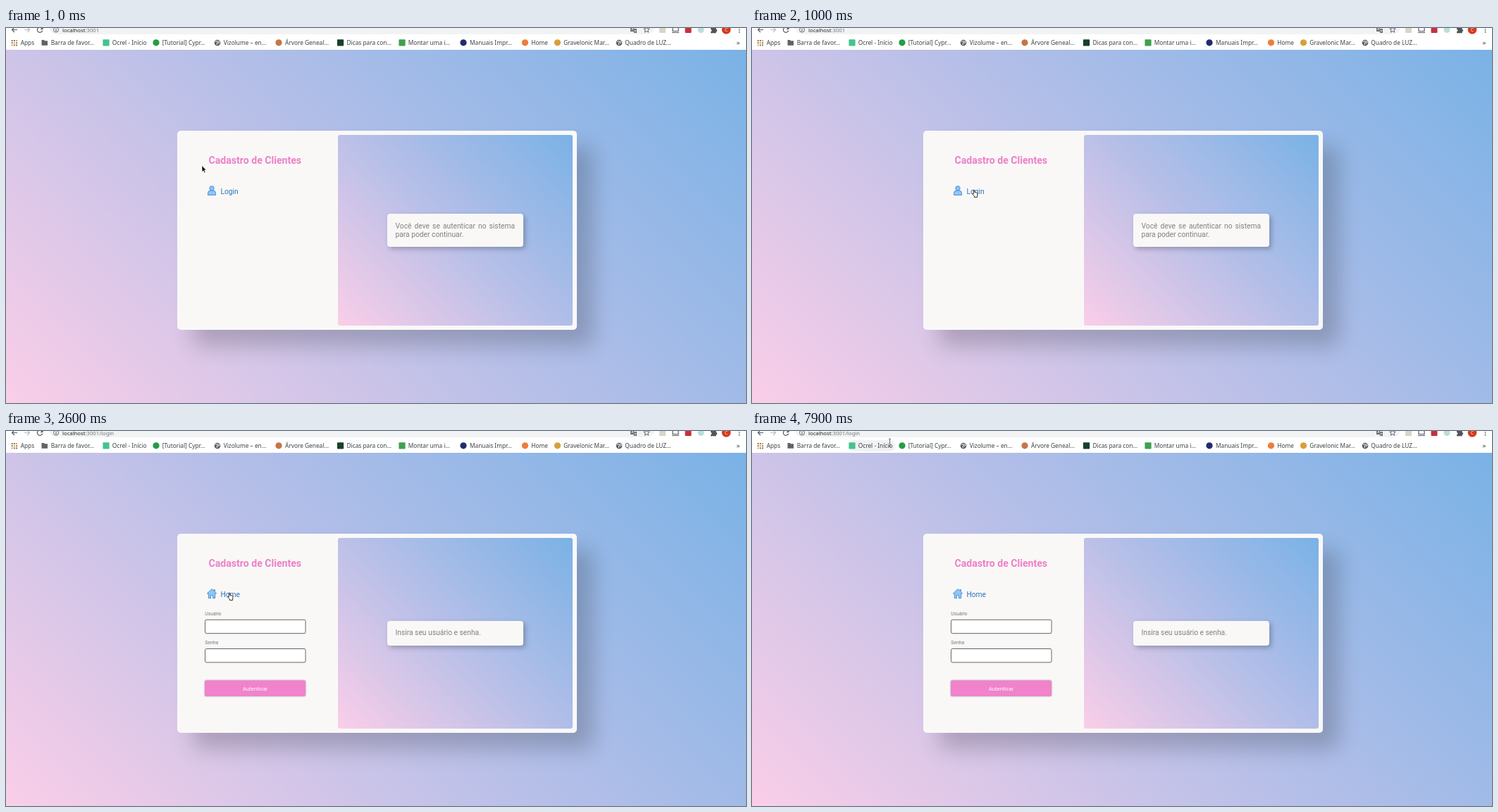
An HTML page that plays this animation: 1050 by 533 pixels, repeating every 8 s.

```html
<!DOCTYPE html>
<html lang="pt">
<head>
<meta charset="utf-8">
<style>
html, body { margin: 0; width: 100%; height: 100%; overflow: hidden; background: #fff; }
div, svg { position: absolute; box-sizing: border-box; }
svg { left: 0; top: 0; }
.sky { background: linear-gradient(45deg, #facee8, #b6bfe8 50%, #7ab2e6); }
#page { left: 0; top: 31px; width: 1050px; height: 502px; }
#card { left: 243px; top: 146px; width: 566.5px; height: 283px; border-radius: 5px;
  background: #f9f8f7; box-shadow: 23px 23px 31px rgba(0, 0, 0, .2); }
#panel { left: 471px; top: 151.5px; width: 333px; height: 271.5px; border-radius: 3px; }
#message { left: 541px; width: 192.5px; padding: 11.5px; border-radius: 4px; background: #f9f8f7;
  box-shadow: 3px 3px 7px rgba(0, 0, 0, .25); color: #808080;
  font: 10.25px/12px Roboto, sans-serif; text-align: justify; }
text { font-family: Roboto, sans-serif; }
.bar text { font: 8.3px "Noto Sans", sans-serif; fill: #3c4043; }
.line { fill: none; stroke: #55595d; stroke-width: 1.2; }
.icon { fill: #8fc5f8; stroke: #3c7fc4; stroke-width: .8; stroke-linejoin: round; }
.link { font-size: 10.25px; fill: #2f72b6; }
.label { font-size: 6.8px; fill: #777; }
.field { fill: #fff; stroke: #555; stroke-width: .9; }
</style>
</head>
<body>
<div id="page" class="sky"></div>
<div id="card"></div>
<div id="panel" class="sky"></div>
<div id="message"></div>

<svg width="1050" height="533" viewBox="0 0 1050 533">
  <defs>
    <g id="globe">
      <circle r="4.3" fill="#55595d"/>
      <path d="M-3-1.5L0-2.5 1-.5-1 .5-.5 3M1.5-3L3-1 1.5 1.5" fill="none" stroke="#fff"/>
    </g>
  </defs>

  <g class="bar">
    <rect x="61" y="-12" width="859" height="21" rx="10.5" fill="#f1f3f4"/>
    <path class="line" d="M16 2.5H8.5M12-1L8.5 2.5 12 6"/>
    <path class="line" d="M26 2.5h7.5M30-1l3.5 3.5L30 6" style="stroke:#b9bcbf"/>
    <path class="line" d="M51.5 1.2A3.7 3.7 0 1 0 51.7 3.5M52-1v2.5H49"/>
    <circle class="line" cx="71" cy="2.5" r="3.5" style="stroke-width:.9"/>
    <path class="line" d="M71 2v2.6M71 .2v1"/>
    <text x="80" y="5.8" style="font-size:7.7px;fill:#222">localhost<tspan id="route" fill="#73777b"></tspan></text>

    <path d="M886-1h5v6h-5zM890 1h5v6h-4z" fill="#6c7074"/>
    <path d="M887.5 3L889 0l1.2 3M891.5 3.5h2.5l-2 2.5" fill="none" stroke="#fff" stroke-width=".7"/>
    <path class="line" d="M909-2l1.2 3 3 .2-2.3 2 .8 3-2.7-1.7-2.7 1.7.8-3-2.3-2 3-.2z" style="stroke-width:.9"/>
    <rect x="927" y="-2" width="9" height="9" rx="1" fill="#d5d8c6"/>
    <path class="line" d="M946-1h8v5.5h-8zM945 6.5h10"/>
    <rect x="963.5" y="-2" width="9" height="9" rx="1" fill="#c5303c"/>
    <circle cx="986" cy="2.5" r="4.5" fill="#b9dfdc"/>
    <path d="M1000-1h2.5a1.5 1.5 0 0 1 3 0h2.2v3a1.5 1.5 0 0 1 0 3v2.2h-7.7V5a1.5 1.5 0 0 0 0-3z" fill="#505458"/>
    <circle cx="1022" cy="2.3" r="6.3" fill="#d23b1e"/>
    <text x="1022" y="5" text-anchor="middle" style="font-size:7px;fill:#f6d5cd">C</text>
    <path d="M1040.500-1v1.500m0 1.500v1.500m0 1.500v1.500" stroke="#505458" stroke-width="1.600"/>

    <rect id="hover" x="137" y="13" width="66" height="16" rx="7" fill="#f1f2f3"/>
    <g id="bookmarks"></g>
    <path d="M50.500 17h3.500l1 1.200h4v6.600h-8.500z" fill="#5f6368"/>
    <use href="#globe" x="300" y="21"/>
    <use href="#globe" x="870" y="21"/>
    <text x="1036.500" y="24" style="font-size:9.500px">»</text>
  </g>

  <text x="287.500" y="192.700" font-size="14.100" font-weight="700" fill="#ee7fc8">Cadastro de Clientes</text>
  <text id="link" class="link" y="235.700"></text>
  <g id="person" class="icon">
    <path d="M286.500 237.500v-2.500q0-4 3.500-4h4q3.500 0 3.500 4v2.500z"/>
    <circle cx="292" cy="227.800" r="3.200"/>
  </g>
  <path id="house" class="icon" d="M292 224.500l-6.700 6.500h2v6.700h3.200v-4h3v4h3.200V231h2l-2.200-2.200V225.500h-1.600v1.700z"/>
  <g id="form">
    <text class="label" x="282.300" y="261.800">Usuário</text>
    <rect class="field" x="282.500" y="268.300" width="142.500" height="19.400" rx="2"/>
    <text class="label" x="282.300" y="303.200">Senha</text>
    <rect class="field" x="282.500" y="309.500" width="142.500" height="19.400" rx="2"/>
    <rect x="282" y="354.500" width="143" height="22.500" rx="2" fill="#f083cb"
      style="filter:drop-shadow(0 .5px 1px rgba(0,0,0,.4))"/>
    <text x="353.500" y="368.700" font-size="7.800" fill="#fff" text-anchor="middle">Autenticar</text>
  </g>

  <g id="cursor" stroke-linejoin="round">
    <path id="arrow" d="M0 0v9l2-1.800 1.500 3.300 1.500-.7-1.500-3.200h2.700z" fill="#111" stroke="#fff" stroke-width=".6"/>
    <path id="hand" d="M.2 6V1q0-1 .8-1t.8 1v2.500l3.200.6q1 .2 1 1.200L5.600 9v1.500H1.500V9L-1.500 6q.2-1.200 1.700 0z"
      fill="#fff" stroke="#222" stroke-width=".9"/>
    <path id="beam" d="M-1.500-5.500Q0-5.500 0-4.500V4.500Q0 5.500-1.500 5.500M1.500-5.500Q0-5.500 0-4.500M0 4.500Q0 5.500 1.500 5.500"
      fill="none" stroke="#444" stroke-width=".8"/>
  </g>
</svg>

<script>
const $ = id => document.getElementById(id);
const show = (id, on) => { $(id).style.display = on ? '' : 'none'; };

// label x, label, icon x, icon colour, icon corner radius
const bookmarks = [
  [20.7, 'Apps'],
  [63.7, 'Barra de favor…'],
  [150.7, 'Ocrel - Início', 142, '#43c58d', 1],
  [221.7, '[Tutorial] Cypr…', 213, '#259c45', 4.5],
  [308.7, 'Vizolume – en…', 0],
  [396, 'Árvore Geneal…', 387, '#c47648', 4.5],
  [483.5, 'Dicas para con…', 474.5, '#17402a', 1],
  [570.7, 'Montar uma i…', 562, '#3da24f', 1],
  [658, 'Manuais Impr…', 649, '#202c70', 4.5],
  [745.3, 'Home', 736.5, '#ee7d3b', 4.5],
  [791.2, 'Gravelonic Mar…', 782.5, '#d6a03c', 4.5],
  [878.3, 'Quadro de LUZ…', 0],
];
const dotColors = ['#dd5144', '#4a8f58', '#d9a441'];
let marks = bookmarks.map(([x, label, iconX, color, r]) =>
  `<text x="${x}" y="23.7">${label}</text>` +
  (iconX ? `<rect x="${iconX - 4.6}" y="16.200" width="9.200" height="9.200" rx="${r}" fill="${color}"/>` : '')
).join('');
for (let i = 0; i < 9; i++) {
  const col = i % 3, row = (i - col) / 3;
  marks += `<rect x="${7.7 + col * 3.2}" y="${17 + row * 3.2}" width="2" height="2" fill="${dotColors[(col + row) % 3]}"/>`;
}
$('bookmarks').innerHTML = marks;

// pointer poses, each held until the next: ms, x, y, shape
const poses = [
  [0, 278, 195.5, 'arrow'],
  [600, 285, 202, 'arrow'],
  [700, 296, 213, 'arrow'],
  [800, 305, 223, 'arrow'],
  [900, 310, 228, 'hand'],
  [1000, 314, 230, 'hand'],
  [1100, 316, 230, 'hand'],
  [7300, 315.7, 231, 'arrow'],
  [7400, 265.700, 125, 'arrow'],
  [7600, 254, 104, 'arrow'],
  [7700, 229, 61, 'arrow'],
  [7800, 205, 31, 'arrow'],
  [7900, 195.5, 16.5, 'beam'],
];

function draw(t) {
  const login = t >= 2500, ready = t >= 2600;
  $('route').textContent = ready ? ':3001/login' : ':3001';
  $('link').textContent = login ? 'Home' : 'Login';
  $('link').setAttribute('x', login && !ready ? 290.7 : 304.4);
  $('message').textContent = login
    ? 'Insira seu usuário e senha.'
    : 'Você deve se autenticar no sistema para poder continuar.';
  $('message').style.top = login ? '269.5px' : '264px';
  show('person', !login);
  show('house', ready);
  show('form', login);
  show('hover', t >= 7900);

  const [, x, y, shape] = poses.findLast(p => p[0] <= t);
  $('cursor').setAttribute('transform', `translate(${x} ${y})`);
  for (const id of ['arrow', 'hand', 'beam']) show(id, id === shape);
}

const start = performance.now();
function tick() {
  draw((performance.now() - start) % 8000);
  requestAnimationFrame(tick);
}
tick();
</script>
</body>
</html>
```
